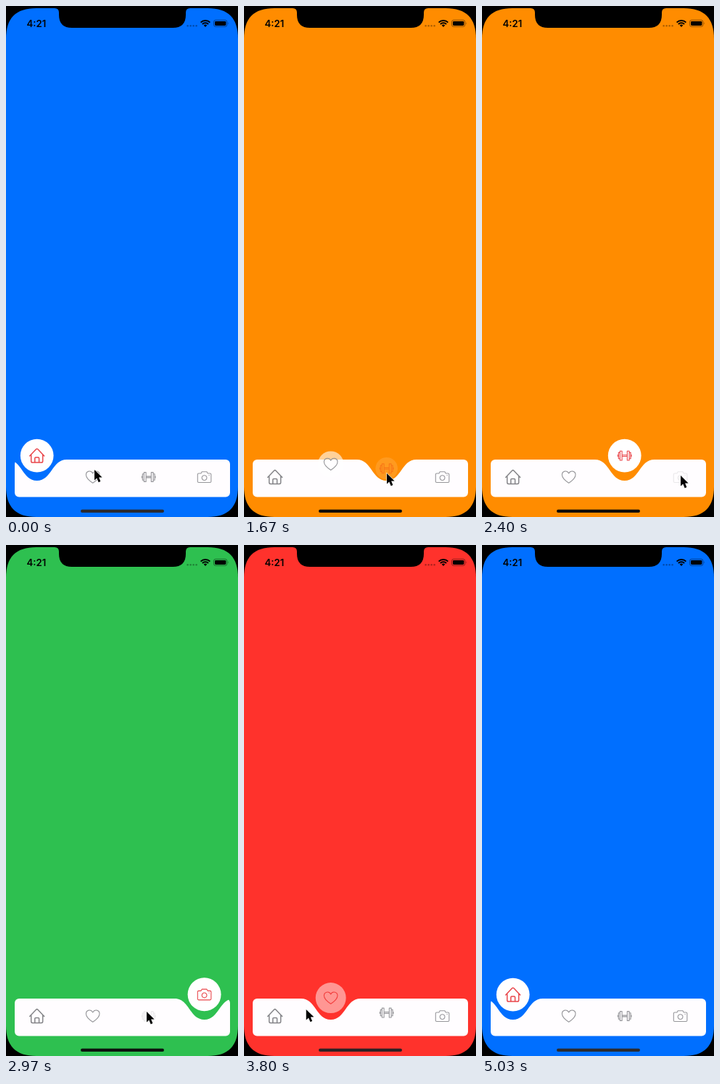
Recreate the animation shown at these times as an HTML page. Size 320 px wide and 703 px high, loop 5.06 s.

```html
<!DOCTYPE html>
<html lang="en">
<head>
<meta charset="utf-8">
<title>Curved tab bar</title>
<style>
  html, body { margin: 0; width: 100%; height: 100%; overflow: hidden; background: #000; }
  svg { display: block; width: 320px; height: 703px; }
  .icon { fill: none; stroke-width: 1.1; stroke-linecap: round; stroke-linejoin: round; }
  .home { stroke-width: 1.5; }
  text { font: 600 13.2px Inter, "Liberation Sans", sans-serif; }
</style>
</head>
<body>
<svg viewBox="0 0 320 703">
  <rect width="320" height="703" fill="#000"/>
  <path id="screen" d="M42 3H278C307 3 320 17 320 45V661C320 689 307 703 278 703H42C13 703 0 689 0 661V45C0 17 13 3 42 3Z"/>
  <path d="M67 2V3Q73 3 73 9V12Q73 30 91 30H230Q248 30 248 12V9Q248 3 254 3V2Z"/>

  <text x="28.5" y="28.6">4:21</text>
  <g opacity=".32">
    <circle cx="250.6" cy="27.2" r="1.2"/><circle cx="254.6" cy="27.2" r="1.2"/>
    <circle cx="258.6" cy="27.2" r="1.2"/><circle cx="262.6" cy="27.2" r="1.2"/>
  </g>
  <g fill="none" stroke="#000" stroke-width="2">
    <path d="M268.6 22.6A9 9 0 0 1 281.4 22.6"/>
    <path d="M270.9 25A5.8 5.8 0 0 1 279.1 25"/>
  </g>
  <path d="M275 29L272.7 26.6A3.3 3.3 0 0 1 277.3 26.6Z"/>
  <rect x="286.5" y="19.4" width="18.4" height="9" rx="2.6" fill="none" stroke="#000" stroke-opacity=".42"/>
  <rect x="288" y="20.9" width="15.4" height="6" rx="1.4"/>
  <path d="M306 22.3Q307.4 23.9 306 25.5Z" opacity=".45"/>

  <rect x="12" y="624" width="297" height="51.5" rx="6" fill="#fffdff"/>
  <path id="dip"/>
  <g id="tabs"></g>
  <rect id="indicator" x="103" y="692.8" width="115" height="4.2" rx="2.1"/>
  <path id="cursor" d="M0 0V14.6L3.3 11.6L5.7 17.2L8.4 16L6.1 10.6L10.6 10.4Z" stroke="#fff" stroke-width="1.1" paint-order="stroke"/>
</svg>
<script>
const LOOP = 5060, GRAY = '#97979b', RED = '#e9474b';
const REST_Y = 648, RAISED_Y = 618.6;

const tabs = [
  { x: 42.7, color: '#006fff', indicator: '#2b2b30', cls: 'icon home',
    d: 'M-10 .4L-1.2 -8.8Q0 -9.9 1.2 -8.8L10 .4M-8 -1.4V7.6Q-8 9.4 -6.2 9.4H6.2Q8 9.4 8 7.6V-1.4M-2.9 9.2V3.6Q-2.9 2.4 -1.7 2.4H1.7Q2.9 2.4 2.9 3.6V9.2' },
  { x: 119.7, color: '#ff322c', indicator: '#2f2124', cls: 'icon',
    d: 'M0 8.2C-4 5.6 -9.3 1.4 -9.3 -3C-9.3 -8.6 -2.4 -9.8 0 -5C2.4 -9.8 9.3 -8.6 9.3 -3C9.3 1.4 4 5.6 0 8.2Z' },
  { x: 196.7, color: '#ff8c00', indicator: '#120d08', cls: 'icon',
    d: 'M-3.6 -.9H3.6M-3.6 .9H3.6' + [-1, 1].map(s =>
      `M${s * 3.6} -6.4V6.4H${s * 6.4}V-6.4ZM${s * 6.4} -4.2H${s * 8.4}V4.2H${s * 6.4}M${s * 8.4} -1H${s * 9.3}V1H${s * 8.4}`).join('') },
  { x: 273.6, color: '#2ec050', indicator: '#0b120d', cls: 'icon',
    d: 'M-7.8 -5H-4.6L-3.4 -7.2H3.4L4.6 -5H7.8Q9.3 -5 9.3 -3.5V6Q9.3 7.5 7.8 7.5H-7.8Q-9.3 7.5 -9.3 6V-3.5Q-9.3 -5 -7.8 -5ZM3.4 1.1A3.4 3.4 0 1 1 -3.4 1.1A3.4 3.4 0 1 1 3.4 1.1M6.4 -2.4H6.7' },
];

// [time, tab]
const taps = [[990, 1], [1560, 2], [2420, 3], [3000, 2], [3560, 1], [4085, 0]];

// [start, end, x, y]: the pointer glides to x, y between start and end
const moves = [
  [1130, 1430, 197, 643], [1860, 2230, 274, 646], [2590, 2890, 194, 642],
  [3130, 3430, 111, 637], [3680, 3970, 44, 642], [4330, 4660, 120, -24],
];

const $ = id => document.getElementById(id);
const clamp = v => Math.min(1, Math.max(0, v));
const smooth = v => (v = clamp(v), v * v * (3 - 2 * v));

function make(tag, parent, attrs = {}) {
  const node = document.createElementNS('http://www.w3.org/2000/svg', tag);
  return parent.appendChild(set(node, attrs));
}
function set(node, attrs) {
  for (const key in attrs) node.setAttribute(key, attrs[key]);
  return node;
}

for (const tab of tabs) {
  tab.group = make('g', $('tabs'));
  tab.disc = make('circle', tab.group, { fill: '#fff' });
  tab.icon = make('path', tab.group, { d: tab.d, class: tab.cls });
}

function spring(ms) {
  if (ms <= 0) return 0;
  const t = ms / 1000, w = 2 * Math.PI / 0.55, z = 0.825, k = Math.sqrt(1 - z * z);
  return 1 - Math.exp(-z * w * t) * (Math.cos(w * k * t) + z / k * Math.sin(w * k * t));
}

// Buttons dim while held and fade back after release
function pressOpacity(index, t) {
  for (const [time, tab] of taps) {
    const age = t - time;
    if (tab === index && age > -100 && age < 500) return 0.2 + 0.8 * smooth(age / 500);
  }
  return 1;
}

function cursorAt(t) {
  let x = 122, y = 638;
  for (const [start, end, toX, toY] of moves) {
    const p = smooth((t - start) / (end - start));
    x += (toX - x) * p;
    y += (toY - y) * p;
  }
  return `translate(${x} ${y})`;
}

function draw(t) {
  const step = taps.filter(([time]) => time <= t).length;
  const [time, current] = step ? taps[step - 1] : [taps[5][0] - LOOP, 0];
  const previous = step > 1 ? taps[step - 2][1] : step ? 0 : 1;
  const progress = spring(t - time);
  const { x, color, indicator } = tabs[current];

  set($('screen'), { fill: color });
  set($('indicator'), { fill: indicator });
  set($('dip'), {
    fill: color,
    d: `M${x - 41} 623V624C${x - 20.5} 624 ${x - 20.5} 653 ${x} 653S${x + 20.5} 624 ${x + 41} 624V623Z`,
  });

  tabs.forEach((tab, i) => {
    const lift = i === current ? progress : i === previous ? 1 - progress : 0;
    set(tab.group, {
      transform: `translate(${tab.x} ${REST_Y + (RAISED_Y - REST_Y) * lift})`,
      opacity: pressOpacity(i, t),
    });
    set(tab.disc, { r: 10.3 + 12.6 * lift, 'fill-opacity': clamp(lift) });
    set(tab.icon, { stroke: i === current ? RED : i ? GRAY : '#858589' });
  });
  set($('cursor'), { transform: cursorAt(t) });
}

const begin = performance.now();
function tick() {
  draw((performance.now() - begin) % LOOP);
  requestAnimationFrame(tick);
}
tick();
</script>
</body>
</html>
```
